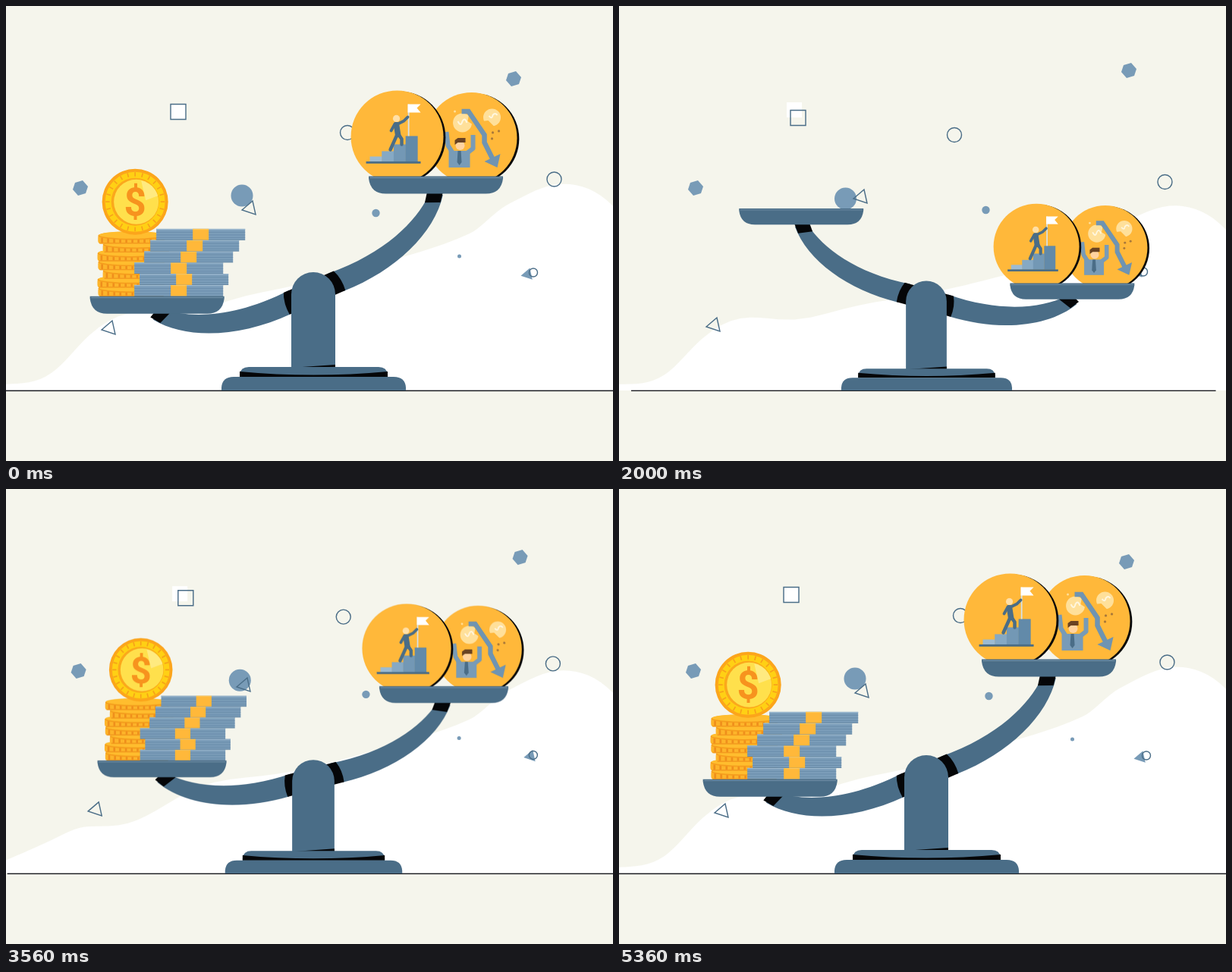
These frames come from a looping animation (800 by 600 pixels, 5.4 s). An HTML page with a canvas:

```html
<!DOCTYPE html>
<html lang="en">
<head>
<meta charset="utf-8">
<title>Balance</title>
<style>
html, body { margin: 0; width: 100%; height: 100%; overflow: hidden; background: #f5f5ec; }
canvas { display: block; width: 800px; height: 600px; }
</style>
</head>
<body>
<canvas id="stage" width="800" height="600"></canvas>
<script>
const LOOP = 5400, STEP = 40, CUT = 580, SHUTTER = 20, TAU = Math.PI * 2;
const BG = '#f5f5ec', STEEL = '#4a6d87', SOFT = '#789bb7', GOLD = '#ffb83a', INK = '#050608';
const screen = document.getElementById('stage').getContext('2d');
const layer = document.createElement('canvas');
layer.width = 800; layer.height = 600;
const c = layer.getContext('2d');

const clamp = v => Math.max(0, Math.min(1, v));
const easeOut = p => 1 - (1 - clamp(p)) ** 3;

function fill(color, path) { c.fillStyle = color; c.fill(path); }
function line(color, width, path) { c.strokeStyle = color; c.lineWidth = width; c.stroke(path); }
function rect(color, x, y, w, h) { c.fillStyle = color; c.fillRect(x, y, w, h); }
function oval(color, x, y, rx, ry = rx) {
  c.fillStyle = color;
  c.beginPath(); c.ellipse(x, y, rx, ry, 0, 0, TAU); c.fill();
}
function ring(r) {
  c.strokeStyle = STEEL; c.lineWidth = 1.4;
  c.beginPath(); c.arc(0, 0, r, 0, TAU); c.stroke();
}
function at(x, y, draw, sx = 1, sy = sx) {
  c.save(); c.translate(x, y); c.scale(sx, sy); draw(); c.restore();
}

// Hill: a fixed outline, a swaying ripple on the left and a sag on the right that recovers
const outline = [[-60, 507], [0, 491], [60, 478], [110, 450], [210, 403], [380, 369],
  [480, 343], [610, 300], [660, 262], [735, 234], [800, 263], [900, 400], [1080, 507]];
function hillShift(x, t) {
  const wake = clamp((t - 640) / 1360), swing = Math.cos(TAU * (t - 2000) / 3360);
  const crest = 98 + 42 * swing;
  const ripple = 22 * swing ** 2 * Math.exp(-(((x - 130) / 130) ** 2)) * Math.cos(TAU * (x - crest) / 260);
  const sag = .04 * Math.max(0, x) * Math.exp(-Math.max(0, t - 2000) / 900);
  return wake * (sag - ripple);
}
function hill(t) {
  const y = i => outline[Math.max(0, Math.min(i, outline.length - 1))][1];
  const x = i => outline[Math.max(0, Math.min(i, outline.length - 1))][0];
  const slope = i => (y(i + 1) - y(i - 1)) / (x(i + 1) - x(i - 1));
  c.fillStyle = '#fff';
  c.beginPath();
  c.moveTo(-60, 507);
  for (let i = 0; i < outline.length - 1; i++) {
    const d = x(i + 1) - x(i);
    for (let p = .125; p <= 1; p += .125) {
      const q = 1 - p, px = x(i) + d * p;
      const py = y(i) * q * q * (1 + 2 * p) + y(i + 1) * p * p * (3 - 2 * p)
        + d * p * q * (slope(i) * q - slope(i + 1) * p);
      c.lineTo(px, Math.min(507, py + hillShift(px, t)));
    }
  }
  c.fill();
}

// Floating shapes: home, offset at the start of the drift, sideways sway on the way
const triangle = new Path2D('M-10 2L4-10L8 8Z');
const hexagon = new Path2D('M10-2L3-10L-7-7L-10 2L-3 10L7 7Z');
const square = new Path2D('M-10-10H10V10H-10Z');
const hex = () => fill(SOFT, hexagon);
const tri = () => line(STEEL, 1.4, triangle);
const shape = (x, y, dx, dy, sway, draw) => ({ x, y, dx, dy, sway, draw });
const back = [
  shape(227, 139.5, 4, -2.5, 0, () => fill('#fff', square)),
  shape(669, 96, 3, -11, 7, hex),
  shape(98, 240, 3, 0, -4, hex),
  shape(450, 167, -8, 3, -1, () => ring(9.5)),
  shape(311, 250, -12.5, 4, 4, () => oval(SOFT, 0, 0, 14.5)),
  shape(487.5, 273, -4, -4, -11, () => oval(SOFT, 0, 0, 5.2)),
  shape(722.5, 228.5, -3, 3.5, 0, () => ring(9.5)),
  shape(597.5, 330, 3, -3, -2, () => oval(SOFT, 0, 0, 2.5)),
  shape(687, 354, -4, -3, 6, () => at(0, 0, () => fill(SOFT, triangle), .85)),
  shape(695, 351.5, -4, -1, 2, () => ring(5.5)),
  shape(136, 425, -11, -4, -12, tri)
];
const front = [
  shape(227, 139.5, 9, 8, 5, () => line(STEEL, 1.4, square)),
  shape(321, 267, -2, -15, -6, tri)
];
function floaters(list, t) {
  const p = t < CUT ? 1 : clamp((t - 2000) / 3360), sway = Math.sin(Math.PI * p);
  list.forEach((s, i) => {
    const pop = t < CUT ? 1 : easeOut((t - 760 - i * 20) / 240);
    if (pop) at(s.x + s.dx * (1 - p) + s.sway * sway, s.y + s.dy * (1 - p), s.draw, pop);
  });
}

// Items fall a short way onto a pan
function drop(t, start, draw) {
  const q = t < CUT ? 1 : (t - start) / 260;
  if (q <= 0) return;
  c.save();
  c.globalAlpha = clamp(q * 4);
  c.translate(0, -111 * (1 - clamp(q) ** 2));
  draw();
  c.restore();
}

function coinRow(x, y) {
  c.fillStyle = '#fdb42a';
  c.beginPath(); c.roundRect(x, y, 88, 12, 4); c.fill();
  for (let k = 0; k < 11; k++) rect('#ef8f1c', x + 4 + k * 8, y + 4, 2.6, 7);
  rect('#f39a1f', x + 2, y + 10.6, 84, 1.4);
  oval('#f59d1d', x + 44, y + 1.5, 44, 5.5);
  oval('#ffbd2e', x + 44, y + .5, 43, 4.8);
}
function bill(x, y) {
  rect('#7b9db9', x, y, 117, 14.7);
  [4, 7.5, 11].forEach(d => rect('#6b8eac', x, y + d, 117, 1));
  rect('#9ebad0', x, y, 117, 1.3);
  rect('#5d809d', x, y + 14, 117, .8);
  rect(GOLD, x + 48, y, 21, 14.7);
  rect('#ffc85c', x + 48, y, 21, 1.3);
}
function dollar() {
  oval('#fca51b', 0, 0, 43.5);
  oval('#ffd014', 0, 0, 39.5);
  for (let k = 0; k < 24; k++) {
    c.save(); c.rotate(k * TAU / 24);
    rect('#f7a01c', 33.5, -.8, 5.5, 1.6);
    c.restore();
  }
  oval('#fba81c', 0, 0, 31.5);
  oval('#ffe04c', 1.5, 0, 29.5);
  fill('#ffea80', new Path2D('M8-28A30 30 0 0 1 30-8L14-2Z'));
  c.fillStyle = '#f7931e';
  c.font = 'bold 51px Roboto, sans-serif';
  c.textAlign = 'center'; c.textBaseline = 'alphabetic';
  c.fillText('$', 0, 18.5);
}
const billX = [-30, -23, -30, -17, -9, -1];
function money(t) {
  for (let i = 0; i < 7; i++) {
    drop(t, 2346 + 60 * i, () => coinRow(-76 - 4.5 * Math.sin(i * 2.1 + .4), -11.6 * (i + 1)));
  }
  billX.forEach((x, i) => drop(t, 2446 + 60 * i, () => bill(x, -14.8 * (i + 1))));
  drop(t, 2812, () => at(-29, -124.5, dollar));
}

function climber() {
  ['#9dbbd2', '#86a9c4', '#7398b5', '#628aa9'].forEach((color, i) => {
    const y = 26 - 7 * i - i * (i - 1);
    rect(color, -36 + 15.7 * i, y, 16, 33 - y);
  });
  rect(STEEL, -41, 32.5, 72, 2.8);
  rect('#d6e2ea', 14.2, -43, 1.8, 42);
  fill('#fff', new Path2D('M14-43H31L26-38L31-32H14Z'));
  c.lineCap = c.lineJoin = 'round';
  line(STEEL, 7.5, new Path2D('M-1-16L1-3'));
  line(STEEL, 4.5, new Path2D('M0-3L-4 6L-9 17M2-3L6 3L6 10'));
  line(STEEL, 3.8, new Path2D('M-3-17L-8-8M1-17L9-21L14-26'));
  oval('#ffdfa6', -1, -24, 4.6);
}
function crash() {
  oval('#ffe09a', -12, -20, 12.5);
  oval('#ffe09a', 27, -27, 11.5);
  fill(GOLD, new Path2D('M-3-34L-5-22L4-16L8-34ZM13-22L22-23L30-15L20-10Z'));
  line('#fff7df', 2, new Path2D('M-18-22q4 8 6 0q3-6 6 2M23-29q4 5 5-1q3-4 6 0'));
  [[36, -9], [28, -7], [27, 1]].forEach(([x, y]) => oval('#a9793a', x, y, 1.6));
  oval('#ffe09a', -22, -35, 1.5);
  c.lineJoin = 'miter'; c.lineCap = 'butt';
  line('#6f94b2', 6.5, new Path2D('M-13-35H-4L17-4V6L29 30'));
  fill('#6f94b2', new Path2D('M17 31L38 21L34 39Z'));
  c.lineJoin = 'round';
  line(SOFT, 6, new Path2D('M-33-8L-31 10L-24 21M2-4V14L-7 21'));
  fill(SOFT, new Path2D('M-30 17H-2V39H-30Z'));
  fill(STEEL, new Path2D('M-18 17H-14L-13 32L-16 36L-19 32Z'));
  oval('#ffd3a0', -15, 10, 6);
  fill('#694323', new Path2D('M-22 9V3L-18 0H-8V6L-18 6Z'));
}
function ball(x, y, r, icon) {
  oval(INK, x + 2.8, y + 1, r);
  oval(GOLD, x, y, r);
  at(x, y, icon);
}
function balls(t) {
  drop(t, 1340, () => ball(47, -73.5, 60, crash));
  drop(t, 1240, () => ball(-51, -75, 61, climber));
}

// Scale
const PIVOT = 378, REACH = 200, RISE = 56;
const arm = new Path2D('M38 14C112 16 178-9 208-51L190-57.5C162-33 108-10 28-15.5Z');
const cuff = new Path2D('M20-15.5H36Q42-2 40 14H20Z');
const tip = new Path2D('M182-51L201-43L210-55L192-65Z');
const pan = new Path2D('M-88.5-23H88.5V-20Q86 0 66 0H-66Q-86 0-88.5-20Z');

// Balls pull the beam right, then money pulls it left
function tiltAt(t) {
  if (t < CUT) return 23.3;
  return -15.4 * easeOut((t - 1490) / 420) + 38.7 * easeOut((t - 2710) / 2147);
}

function scales(t) {
  const tilt = tiltAt(t) * TAU / 360, cos = Math.cos(tilt), sin = Math.sin(tilt);

  c.save();
  c.translate(405, PIVOT);
  c.rotate(-tilt);
  [1, -1].forEach(side => at(0, 0, () => {
    fill(STEEL, arm); fill(INK, cuff); fill(INK, tip);
  }, side, 1));
  c.restore();

  fill(STEEL, new Path2D('M376 478V380A29 29 0 0 1 434 380V478Z'));
  fill(INK, new Path2D('M376 477L434 473V478H376Z'));
  fill(STEEL, new Path2D('M308 489V486Q309 476 320 476H491Q502 476 503 486V489Z'));
  fill(INK, new Path2D('M308 482Q405 491 503 482V489H308Z'));
  fill(STEEL, new Path2D('M284 507V503Q285 489 300 489H511Q526 489 527 503V507Z'));

  [[-1, money, -23], [1, balls, 0]].forEach(([side, load, lift]) => {
    const x = 405 + side * REACH * cos - RISE * sin;
    const y = PIVOT - side * REACH * sin - RISE * cos;
    at(x, y, () => {
      at(0, lift, () => load(t));
      fill(STEEL, pan);
      rect('#7f9cb2', -87, -21.4, 174, .8);
    });
  });
}

// Short tremble while the money lands
function shake(t) {
  const p = clamp((t - 2700) / 400);
  return 1.6 * Math.sin(p * 14.3) * Math.sin(Math.PI * p);
}

function scene(t) {
  rect(BG, 0, 0, 800, 600);
  const leaving = t < CUT, p = clamp(t / 560);
  const slide = leaving ? -1250 * p ** 3 : 420 * Math.max(0, (1033 - t) / 393) ** 3;
  const zoom = leaving ? 1 + .43 * p ** 2 : 1;
  const size = leaving ? 1 : 1 - .022 * (5.36 - t / 1000);

  c.save();
  c.translate(400 + slide, 300);
  c.scale(zoom, zoom);
  c.translate(-400, -300);
  hill(leaving ? LOOP : t);
  floaters(back, t);
  c.save();
  c.translate(405, 507 + shake(t));
  c.scale(size, size);
  c.translate(-405, -507);
  rect('#1c1d22', -15, 506.6, 832, 1.5);
  scales(t);
  c.restore();
  floaters(front, t);
  c.restore();
}

// Average several moments around t for motion blur
function render(t) {
  const n = t === 0 ? 1 : t < 1040 ? 16 : 8;
  for (let k = 0; k < n; k++) {
    scene(Math.min(LOOP, t + ((k + .5) / n - .5) * SHUTTER));
    screen.globalAlpha = 1 / (k + 1);
    screen.drawImage(layer, 0, 0);
  }
}

const begin = performance.now();
let shown = -1;
function tick() {
  const t = Math.floor(((performance.now() - begin) % LOOP) / STEP) * STEP;
  if (t !== shown) render(shown = t);
  requestAnimationFrame(tick);
}
tick();
</script>
</body>
</html>
```
